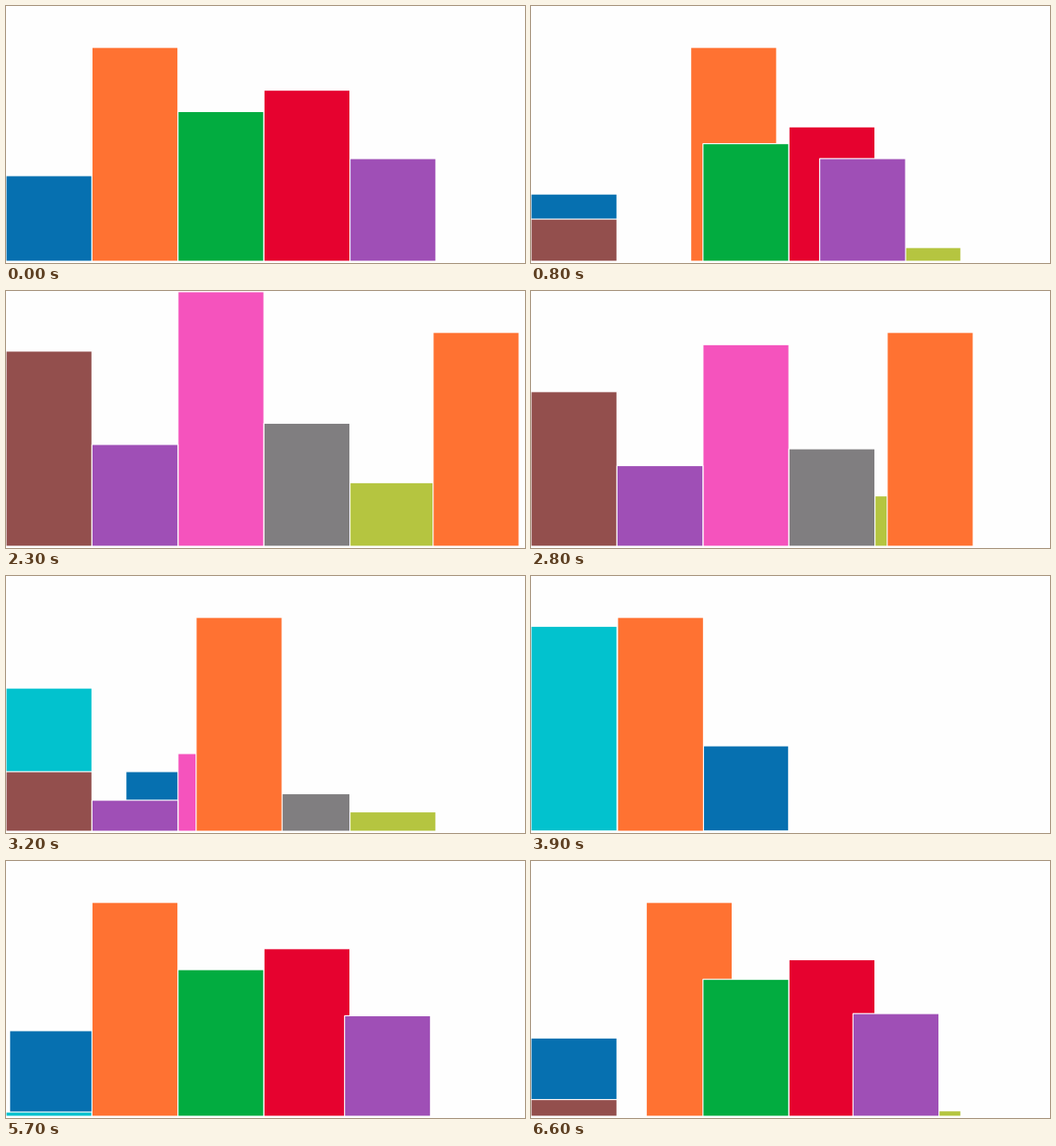
A matplotlib script that plays this animation: 600x298 px, repeating every 6.7 s.

```python
import matplotlib.pyplot as plt
from matplotlib.animation import FuncAnimation
from matplotlib.patches import Rectangle

W, H, DPI = 600, 298, 100
STEP, FRAMES = 100, 67
START, SPAN = 46, 2000      # first transition and length of each, in ms
SLOT, UNIT, BASE = 99.4, 4.96, 296

# Listed from back to front
COLORS = {
    "blue": "#0670b0",
    "pink": "#f553bd",
    "grey": "#807e80",
    "olive": "#b5c540",
    "cyan": "#02c2ce",
    "orange": "#ff7232",
    "green": "#02ac40",
    "red": "#e6022f",
    "brown": "#934f4d",
    "purple": "#9f4fb6",
}

# Each chart lists its bars from left to right with their values
CHARTS = [
    {"blue": 20, "orange": 50, "green": 35, "red": 40, "purple": 24},
    {"brown": 46, "purple": 24, "pink": 60, "grey": 29, "olive": 15, "orange": 50},
    {"cyan": 48, "orange": 50, "blue": 20},
]


def ease(t):
    """Cubic in-out."""
    return 4 * t ** 3 if t < 0.5 else 1 - 4 * (1 - t) ** 3


def slot_at(name, stage):
    """Slot of a bar; an absent bar keeps the last one it had."""
    for back in range(len(CHARTS)):
        names = list(CHARTS[(stage - back) % len(CHARTS)])
        if name in names:
            return names.index(name)


def pose(name, stage):
    chart = CHARTS[stage % len(CHARTS)]
    return slot_at(name, stage) * SLOT, chart.get(name, 0) * UNIT


def mix(a, b, f):
    return a + (b - a) * f


fig = plt.figure(figsize=(W / DPI, H / DPI), dpi=DPI, facecolor="#fefefe")
ax = fig.add_axes([0, 0, 1, 1])
ax.set_xlim(0, W)
ax.set_ylim(H, 0)
ax.axis("off")

bars = {}
for z, (name, color) in enumerate(COLORS.items()):
    bar = Rectangle((0, BASE), SLOT, 0, facecolor=color, edgecolor="white",
                    linewidth=1.2 * 72 / DPI, zorder=z + 2, snap=False)
    bars[name] = ax.add_patch(bar)


def draw(frame):
    stage, passed = divmod(max(frame * STEP - START, 0), SPAN)
    f = ease(passed / SPAN)
    for name, bar in bars.items():
        x0, h0 = pose(name, stage)
        x1, h1 = pose(name, stage + 1)
        if h0 == 0:             # a newcomer with no older place grows on the spot
            seen = any(name in CHARTS[s % 3] for s in range(stage))
            x0 = x0 if seen or stage >= 2 and name != "cyan" else x1
        h = mix(h0, h1, f)
        bar.set_bounds(mix(x0, x1, f), BASE - h, SLOT, h)
        bar.set_visible(h > 0.3)
    return list(bars.values())


anim = FuncAnimation(fig, draw, frames=FRAMES, interval=STEP,
                     repeat=True, repeat_delay=0, blit=False)
plt.show()
```
